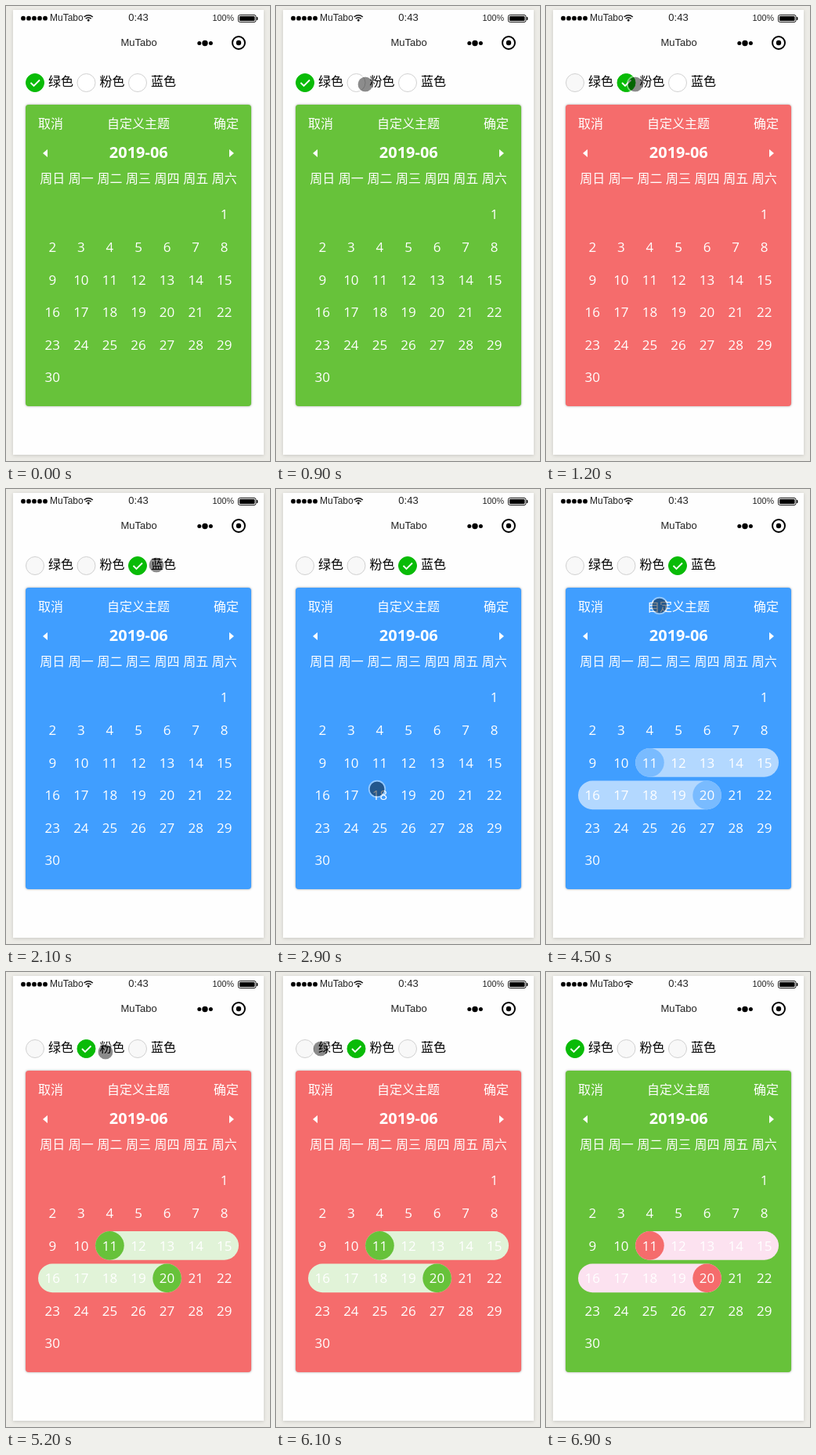
Recreate the animation shown at these times as an HTML page. Size 337 by 581 pixels, loop 7.4 s.

```html
<!DOCTYPE html>
<html lang="zh">
<head>
<meta charset="utf-8">
<title>自定义主题</title>
<style>
html, body { margin: 0; width: 337px; height: 581px; overflow: hidden; background: #ecebe6; }
svg { display: block; width: 337px; height: 581px; }
text { font: 16px "Noto Sans CJK SC", "Noto Sans CJK", sans-serif; }
.phone { fill: #fefefe; filter: drop-shadow(0 1px 2px rgba(0, 0, 0, .15)); }
.bar text { font-family: "Liberation Sans", Arial, sans-serif; fill: #222; }
.panel { fill: var(--main); filter: drop-shadow(0 0 1.5px rgba(0, 0, 0, .35)); }
.cal text, .cal .arrow { fill: #fff; }
.cal .num { font: 500 17px "Open Sans", "Noto Sans", sans-serif; }
.cal .month { font: bold 20px "Open Sans", "Noto Sans", sans-serif; }
.mid { text-anchor: middle; }
.range { stroke: var(--range); stroke-width: 36.6; stroke-linecap: round; }
.dot { fill: var(--dot); }
.radio circle { stroke: #d1d1d1; fill: #fff; }
.radio.used circle { fill: #f8f8f8; }
.radio.on circle { fill: #09bb07; stroke: #09bb07; }
.radio path { fill: none; stroke: #fff; stroke-width: 1.8; visibility: hidden; }
.radio.on path { visibility: visible; }
</style>
</head>
<body>
<svg viewBox="0 0 337 581">
  <rect class="phone" x="9" y="5" width="320" height="568"/>
  <g class="bar">
    <g id="signal"></g>
    <text x="56" y="19" style="font-size:12px">MuTabo</text>
    <g fill="none" stroke="#111" stroke-width="1.5">
      <path d="M99.6 14q5.6-4.600 11.2 0M101.7 16.200q3.5-2.800 7 0"/>
      <circle cx="105.2" cy="18.2" r=".7" fill="#111"/>
    </g>
    <text class="mid" x="169" y="18.5" style="font-size:13px">0:43</text>
    <text x="263.5" y="19" style="font-size:10.8px">100%</text>
    <rect x="296.5" y="11.5" width="22.5" height="9" rx="2" fill="none" stroke="#111"/>
    <rect x="298" y="13" width="19.5" height="6" rx="1"/>
    <path d="M320 14h1q1 2 0 4h-1z"/>
    <text class="mid" x="169.5" y="51" style="font-size:13px">MuTabo</text>
    <circle cx="246.8" cy="47.5" r="2.5"/>
    <circle cx="254" cy="47.5" r="3.7"/>
    <circle cx="261.4" cy="47.5" r="2.5"/>
    <circle cx="297" cy="47" r="8" fill="none" stroke="#000" stroke-width="2"/>
    <circle cx="297" cy="47" r="3.2"/>
  </g>
  <g id="radios"></g>
  <g class="cal">
    <rect class="panel" x="25" y="126" width="288" height="385" rx="4"/>
    <text x="41" y="156">取消</text>
    <text class="mid" x="169" y="156">自定义主题</text>
    <text x="265" y="156">确定</text>
    <path class="arrow" d="M53 183v10l-6-5zM285 183v10l6-5z"/>
    <text class="mid month" x="169.3" y="194">2019-06</text>
    <g id="range"></g>
    <g id="first"></g>
    <g id="days"></g>
  </g>
  <g id="touch">
    <circle r="9.5" fill-opacity=".45"/>
    <circle r="10.3" fill="none" stroke="#fff" stroke-opacity=".45" stroke-width="1.7"/>
  </g>
</svg>
<script>
const LOOP = 7400, STEP = 100, TRAVEL = 600;
const COL = 256 / 7, ROW = COL + 5;
const $ = id => document.getElementById(id);
const svg = document.querySelector('svg');

const themes = [
  { name: '绿色', main: '#67c23a', dot: '#f56c6c', range: '#fce2f0' },
  { name: '粉色', main: '#f56c6c', dot: '#67c23a', range: '#e1f3d8' },
  { name: '蓝色', main: '#409eff', dot: '#79bbff', range: '#b3d8ff' }
];
const picks = [
  { at: 0, theme: 0 }, { at: 1200, theme: 1 }, { at: 2100, theme: 2 },
  { at: 5200, theme: 1 }, { at: 6200, theme: 0 }
];

// where the pointer has arrived, and when
const stops = [
  { at: 200, x: 297, y: 69 },
  { at: 700, x: 76, y: 99 },
  { at: 900, x: 114, y: 100 },
  { at: 2100, x: 192, y: 97 },
  { at: 2800, x: 123, y: 413 },
  { at: 3000, x: 135, y: 353 },
  { at: 3700, x: 206, y: 399 },
  { at: 4600, x: 140, y: 129 },
  { at: 5100, x: 127, y: 102 },
  { at: 6100, x: 57, y: 98 },
  { at: 7100, x: 450, y: 60 }
];

function add(parent, tag, attrs, text) {
  const el = document.createElementNS('http://www.w3.org/2000/svg', tag);
  for (const k in attrs) el.setAttribute(k, attrs[k]);
  if (text) el.textContent = text;
  parent.append(el);
  return el;
}

// centre of a day's cell; the month starts on a Saturday
function cell(day) {
  const i = day + 5;
  return { x: 59.3 + i % 7 * COL, y: 266.2 + Math.floor(i / 7) * ROW };
}

function addDot(parent, day) {
  const { x, y } = cell(day);
  add(parent, 'circle', { class: 'dot', cx: x, cy: y, r: 18.3 });
}

function addRange(from, to) {
  const a = cell(from), b = cell(to);
  add($('range'), 'path', { class: 'range', d: `M${a.x} ${a.y}H${b.x}` });
}

for (let i = 0; i < 5; i++) add($('signal'), 'circle', { cx: 22 + i * 7, cy: 15.7, r: 2.9 });

const radios = themes.map(({ name }, i) => {
  const x = 37 + i * 65.5;
  const g = add($('radios'), 'g', { class: 'radio' });
  add(g, 'circle', { cx: x, cy: 98, r: 11.5 });
  add(g, 'path', { d: `M${x - 5.5} 98l4 4 7.5-7.5` });
  add($('radios'), 'text', { x: x + 17, y: 101.7 }, name);
  return g;
});

[...'日一二三四五六'].forEach((d, i) =>
  add($('days'), 'text', { class: 'mid', x: 59.3 + i * COL, y: 225.7 }, '周' + d));
for (let d = 1; d <= 30; d++) {
  const { x, y } = cell(d);
  add($('days'), 'text', { class: 'mid num', x, y: y + 6.2 }, d);
}
addRange(11, 15);
addRange(16, 20);
addDot($('range'), 20);
addDot($('first'), 11);

const show = (id, on) => $(id).style.visibility = on ? 'visible' : 'hidden';
const ease = k => k * k * (3 - 2 * k);

function pointerAt(t) {
  const n = Math.max(1, stops.findIndex(s => s.at >= t));
  const a = stops[n - 1] , b = stops[n];
  const start = Math.max(a.at, b.at - TRAVEL);
  const k = ease(Math.min(1, Math.max(0, (t - start) / (b.at - start))));
  return [a.x + (b.x - a.x) * k, a.y + (b.y - a.y) * k];
}

function draw() {
  const t = Math.floor(performance.now() % LOOP / STEP) * STEP;
  const past = picks.filter(p => p.at <= t).map(p => p.theme);
  const on = past.pop();
  for (const k of ['main', 'dot', 'range']) svg.style.setProperty('--' + k, themes[on][k]);
  radios.forEach((r, i) => {
    r.classList.toggle('on', i === on);
    r.classList.toggle('used', past.includes(i));
  });
  show('first', t >= 3100);
  show('range', t >= 3900);
  show('touch', t >= stops[0].at && t < 6900);
  $('touch').setAttribute('transform', `translate(${pointerAt(Math.min(t, 7100))})`);
  requestAnimationFrame(draw);
}
draw();
</script>
</body>
</html>
```
